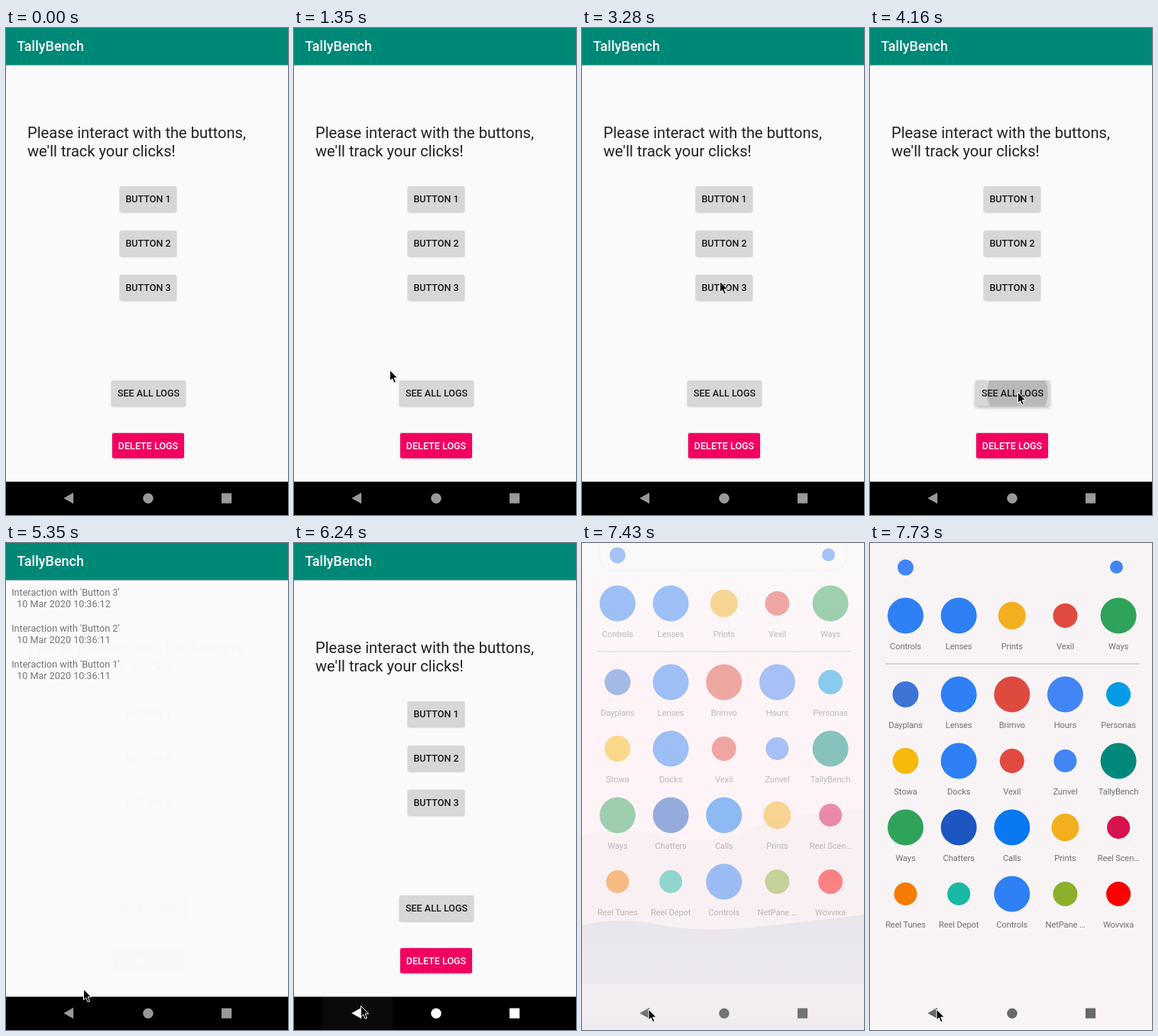
These frames come from a looping animation (369x637 px, 8 s). An HTML page:

```html
<!DOCTYPE html>
<html lang="en">
<head>
<meta charset="utf-8">
<title>TallyBench</title>
<style>
html, body { margin: 0; width: 100%; height: 100%; overflow: hidden; background: #fafafa; }
svg { display: block; width: 100%; height: 100%; font-family: Roboto, sans-serif; }
.btn { filter: drop-shadow(0 1px 1px rgba(0, 0, 0, .24)); }
.btn.up { filter: drop-shadow(0 2px 2px rgba(0, 0, 0, .3)); }
.btn text { font-size: 12.57px; font-weight: 500; text-anchor: middle; }
.log { font-size: 12.6px; fill: #757575; }
.label { font-size: 11.2px; letter-spacing: -.15px; fill: #717171; text-anchor: middle; }
</style>
</head>
<body>
<svg id="stage" viewBox="0 0 369 637"></svg>
<script>
const LOOP = 8000, START = 1340, STEP = 148.3;
const stage = document.getElementById('stage');

// id, caption, x, y, width, height, fill, text colour
const buttons = [
  ['b1', 'BUTTON 1', 149, 207, 74, 33.2, '#d6d7d7', '#1c1c1c'],
  ['b2', 'BUTTON 2', 149, 265, 74, 33.2, '#d6d7d7', '#1c1c1c'],
  ['b3', 'BUTTON 3', 149, 322.7, 74, 33.2, '#d6d7d7', '#1c1c1c'],
  ['all', 'SEE ALL LOGS', 138, 461, 97, 33.2, '#d6d7d7', '#1c1c1c'],
  ['del', 'DELETE LOGS', 139, 529.7, 94, 33, '#f10060', '#fff']
];
const logs = [[3, 12], [2, 11], [1, 11]];

const BLUE = '#2f80f5', RED = '#e04a3f', GOLD = '#f2b01e', GREEN = '#2fa35a';
// name, colour, radius
const apps = [
  [['Controls', BLUE, 23.5], ['Lenses', BLUE, 23.5], ['Prints', GOLD, 18], ['Vexil', RED, 16], ['Ways', GREEN, 23.5]],
  [['Dayplans', '#3d74d6', 17], ['Lenses', BLUE, 23.5], ['Brimvo', '#dd4b3e', 23.5], ['Hours', '#4285f4', 23.5], ['Personas', '#039be5', 16]],
  [['Stowa', '#f7b90c', 17], ['Docks', BLUE, 23.5], ['Vexil', RED, 16], ['Zunvel', '#4285f4', 15], ['TallyBench', '#00897b', 23.5]],
  [['Ways', GREEN, 23.5], ['Chatters', '#1d56c0', 23.5], ['Calls', '#0a78f0', 23.5], ['Prints', GOLD, 18], ['Reel Scen…', '#d8124f', 15]],
  [['Reel Tunes', '#f57c00', 15], ['Reel Depot', '#18b8a4', 15], ['Controls', BLUE, 23.5], ['NetPane …', '#8bb02c', 16], ['Wovvixa', '#f00', 16]]
];
const rowY = [95, 198, 285, 372, 459];

const button = ([id, text, x, y, w, h, fill, ink]) => `
  <clipPath id="${id}Clip"><rect x="${x}" y="${y}" width="${w}" height="${h}" rx="2"/></clipPath>
  <g class="btn" id="${id}">
    <rect x="${x}" y="${y}" width="${w}" height="${h}" rx="2" fill="${fill}"/>
    <circle id="${id}Ripple" clip-path="url(#${id}Clip)" cx="0" cy="0" r="0"/>
    <text x="${x + w / 2}" y="${y + h / 2 + 4.6}" fill="${ink}">${text}</text>
  </g>`;

const logRow = ([n, sec], i) => `
  <text class="log" x="7.2" y="${69.4 + 47 * i}">Interaction with 'Button ${n}'</text>
  <text class="log" x="14.2" y="${84.2 + 47 * i}">10 Mar 2020 10:36:${sec}</text>`;

const appIcon = (row, col, [name, fill, r]) => {
  const x = 46.5 + 69.65 * col, y = rowY[row];
  return `<circle cx="${x}" cy="${y}" r="${r}" fill="${fill}"/>
    <text class="label" x="${x}" y="${y + 44}">${name}</text>`;
};

const fade = (id, from, to) => `
  <linearGradient id="${id}" x2="0" y2="1">
    <stop stop-color="${from}"/><stop offset="1" stop-color="${to}"/>
  </linearGradient>`;

stage.innerHTML = `
  <defs>
    ${fade('barShade', '#0003', '#0000')}
    ${fade('sky', '#faf9fa', '#fef4f7')}
    ${fade('hill', '#e9e6eb', '#efebf0')}
  </defs>
  <rect width="369" height="637" fill="#fafafa"/>
  <g font-size="20.1" fill="#212121">
    <text x="28" y="144">Please interact with the buttons,</text>
    <text x="28" y="167.5">we'll track your clicks!</text>
  </g>
  ${buttons.map(button).join('')}
  <g id="list">
    <rect y="48" width="369" height="546" fill="#fafafa" opacity=".988"/>
    ${logs.map(logRow).join('')}
  </g>
  <rect y="48" width="369" height="2" fill="url(#barShade)"/>
  <rect width="369" height="48.5" fill="#008877"/>
  <text x="14.4" y="30" font-size="18" font-weight="500" fill="#fff">TallyBench</text>
  <rect y="593.5" width="369" height="43.5"/>
  <rect id="navRipple" x="37" y="594" width="92" height="43" fill="#fff"/>
  <g id="home">
    <rect width="369" height="637" fill="#f8f4f6"/>
    <g id="haze">
      <rect width="369" height="637" fill="#fef4f7"/>
      <rect width="369" height="160" fill="url(#sky)"/>
      <path d="M0 382Q60 370 110 384T220 374T369 348V637H0Z" fill="#f9f0f3"/>
      <path d="M0 500Q50 488 100 499T220 503T369 486V637H0Z" fill="url(#hill)"/>
      <rect y="577" width="369" height="45" fill="#f2edf1"/>
    </g>
    <g id="apps">
      <rect id="pill" x="23" y="-10" width="323" height="62" rx="18" fill="#fcfafb" stroke="#f1e5e8"/>
      <circle cx="46.5" cy="32" r="10.5" fill="#4285f4"/>
      <circle cx="322.5" cy="31.5" r="8.5" fill="#4285f4"/>
      <path d="M20 158H352" stroke="#c9c5c7" stroke-width="1.6"/>
      ${apps.map((line, row) => line.map((app, col) => appIcon(row, col, app)).join('')).join('')}
    </g>
  </g>
  <g id="nav">
    <path d="M75.4 615L88.2 607.8V622.2Z"/>
    <circle cx="186" cy="615.2" r="6.7"/>
    <rect x="282" y="608.6" width="13.2" height="13.2" rx=".6"/>
  </g>
  <path id="cursor" d="M.5 .5V14.6L3.7 11.7L6 17.2L8.4 16.2L6.1 10.8H10.6Z" stroke="#fff" stroke-width="1"/>`;

const el = {};
stage.querySelectorAll('[id]').forEach(e => el[e.id] = e);
const set = (id, attrs) => { for (const k in attrs) el[id].setAttribute(k, attrs[k]); };

// Linear interpolation over [step, value, ...] keys, clamped at both ends
function at(n, keys, i = 1) {
  if (n <= keys[0][0]) return keys[0][i];
  for (let k = 1; k < keys.length; k++) {
    const a = keys[k - 1], b = keys[k];
    if (n <= b[0]) return a[i] + (b[i] - a[i]) * (n - a[0]) / (b[0] - a[0]);
  }
  return keys[keys.length - 1][i];
}

const path = [
  [0, 125, 447], [3, 181, 228], [6, 181, 228], [8, 181, 273], [11, 181, 273],
  [13, 180, 331], [15, 180, 331], [17, 193, 470], [18, 193, 476], [23, 193, 476],
  [27, 101, 583], [28, 87, 605], [34, 87, 605], [36, 86.6, 609.4]
];

// Button, press start, ripple centre, last fully pressed step
const presses = [
  ['b1', 5, 181, 228, 6], ['b2', 10, 181, 273, 11],
  ['b3', 14, 180, 331, 15], ['all', 18, 193, 477, 30]
];

function press(n, [id, from, cx, cy, last]) {
  const slow = id === 'all';
  const r = at(n, slow ? [[17, 0], [18, 16], [19, 40], [20, 62]]
                       : [[from - 1, 0], [from, 28], [from + 1, 60]]);
  const opacity = slow ? (n <= last ? .14 : 0) : at(n, [[last, .14], [last + 2, 0]]);
  set(id + 'Ripple', { cx, cy, r, opacity });
  el[id].classList.toggle('up', n >= from && n <= last);
}

const grey = v => `rgb(${v},${v},${v})`;

function draw(t) {
  const n = Math.max(-1, Math.floor((t - START) / STEP));
  presses.forEach(p => press(n, p));
  set('list', { opacity: at(n, [[20, 0], [21, 1], [29, 1], [30, .4], [31, 0]]) });
  set('navRipple', {
    opacity: at(n, [[28, 0], [29, .13], [30, .18], [33, .04], [37, .04], [38, .12], [39, .18]])
  });
  set('home', { opacity: at(n, [[39, 0], [40, .5], [41, 1]]) });
  set('haze', { opacity: at(n, [[41, 1], [42, .4], [43, 0]]) });
  set('pill', { opacity: at(n, [[41, 1], [43, 0]]) });
  set('apps', {
    opacity: at(n, [[39, .1], [41, .46], [42, .85], [43, 1]]),
    transform: `translate(0 ${at(n, [[40, -28], [41, -16], [42, -5], [43, 0]])})`
  });
  set('nav', {
    fill: grey(Math.round(at(n, [[31, 153], [33, 255], [39, 255], [41, 115], [43, 104]])))
  });
  set('cursor', {
    visibility: n < 0 ? 'hidden' : 'visible',
    transform: `translate(${at(n, path)} ${at(n, path, 2)})`
  });
}

const begin = performance.now();
function loop() {
  draw((performance.now() - begin) % LOOP);
  requestAnimationFrame(loop);
}
loop();
</script>
</body>
</html>
```
